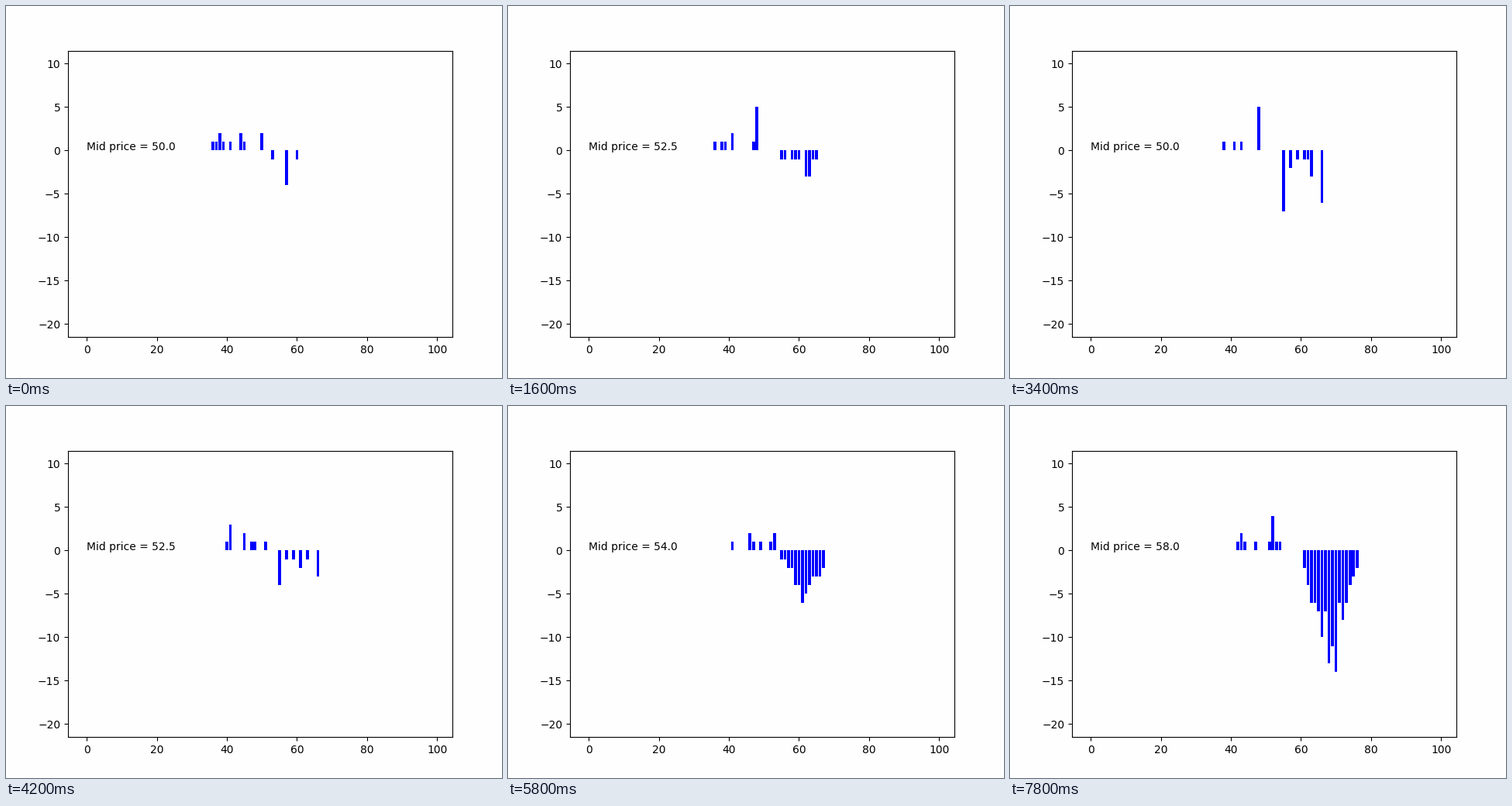
Recreate the animation shown at these times as a matplotlib script. Size 640 by 480 pixels, loop 8000 ms.

```python
import numpy as np
import matplotlib.pyplot as plt
from matplotlib.animation import FuncAnimation

FRAMES, STEP_MS, PRICES = 40, 200, 100
PAPER = "#fefefe"

# Orders resting in the book at the start, one entry per unit
OPEN_BIDS = [36, 37, 38, 38, 39, 41, 44, 44, 45, 50, 50]
OPEN_ASKS = [53, 57, 57, 57, 57, 60]

steps = np.arange(FRAMES)


def path(*points):
    """Value at every step along straight lines through (step, value)."""
    return np.interp(steps, *zip(*points))


mid = path((0, 50), (4, 49.5), (8, 52.5), (13, 52), (16, 49.5), (21, 52.5),
           (29, 54), (34, 60), (36, 60.5), (39, 58))
mid = np.round(mid * 2) / 2
low_bid = path((0, 36), (39, 43))
top_ask = path((0, 60), (7, 66), (24, 66), (29, 69), (39, 76))
ask_total = path((0, 6), (8, 13), (24, 12), (29, 40), (34, 22), (36, 35),
                 (39, 109))


def count(ticks):
    return np.bincount(np.asarray(ticks, int), minlength=PRICES)


def refill(rng, side, total, place):
    """Cancel some orders at random, then add new ones up to the total."""
    keep = min(0.75, total / max(side.sum(), 1))
    side = rng.binomial(side, keep)
    side = side + count(place(max(int(total) - side.sum(), 0)))
    if rng.random() < 0.15:
        side[int(place(1)[0])] += rng.integers(4, 7)  # one large order
    return side


def simulate():
    rng = np.random.default_rng(5)
    bids, asks = count(OPEN_BIDS), count(OPEN_ASKS)
    book = [bids - asks]
    for m, low, top, total in zip(mid[1:], low_bid[1:], top_ask[1:],
                                  ask_total[1:]):
        top = int(top)
        bids[int(m):] = 0  # filled orders leave the book
        asks[:int(m) + 1] = 0
        bids = refill(rng, bids, rng.integers(4, 11),
                      lambda n: rng.integers(int(low), int(m), n))
        asks = refill(rng, asks, total,
                      lambda n: rng.triangular(m + 2, top - 4, top + 1, n))
        book.append(bids - asks)
    return book


book = simulate()

fig, ax = plt.subplots(figsize=(6.4, 4.8), dpi=100, facecolor=PAPER)
ax.set_facecolor(PAPER)
bars = ax.bar(np.arange(PRICES), book[0], color="blue")
ax.set_xlim(-5.39, 104.39)
ax.set_ylim(-21.5, 11.5)
label = ax.text(0, 0, "")


def draw(step):
    for bar, height in zip(bars, book[step]):
        bar.set_height(height)
    label.set_text(f"Mid price = {mid[step]:.1f}")
    return [*bars, label]


anim = FuncAnimation(fig, draw, frames=FRAMES, interval=STEP_MS,
                     repeat=True, repeat_delay=0)
plt.show()
```
